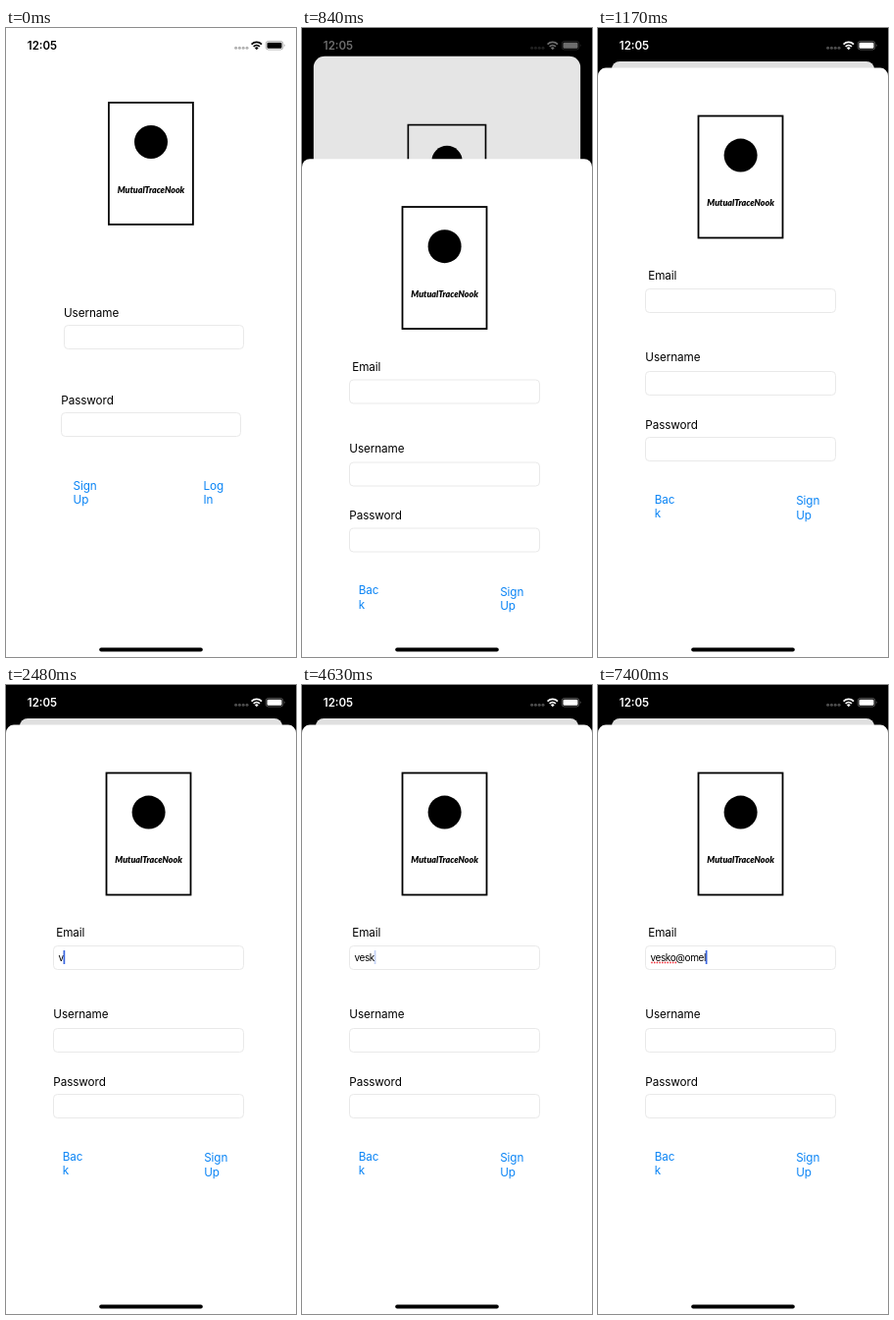
An HTML page for the animation above (8 s loop, 296 by 640 pixels).

```html
<!DOCTYPE html>
<html lang="en">
<head>
<meta charset="utf-8">
<title>Sign up sheet</title>
<style>
  html, body { margin: 0; width: 100%; height: 100%; overflow: hidden; background: #000; }
  svg { display: block; width: 296px; height: 640px; }
  text { font: 11.7px Inter, "Liberation Sans", sans-serif; letter-spacing: -.08px; white-space: pre; }
  .brand { font: italic 900 8.9px Lato, sans-serif; letter-spacing: 0; text-anchor: middle; }
  .clock { font-weight: 600; font-size: 11.5px; letter-spacing: 0; }
  .entry { font-size: 10px; letter-spacing: -.4px; }
  .link { fill: #0a84f5; }
  .field { fill: #fff; stroke: #e9e9e9; }
  #login .field { fill: none; }
  .squiggle { stroke: #f0323c; stroke-width: 1.7; stroke-linecap: round; stroke-dasharray: 0 2.7; }
</style>
</head>
<body>
<svg viewBox="0 0 296 640">
  <defs>
    <g id="logo">
      <rect x="104.9" y="75.9" width="86" height="124" fill="none" stroke="#000" stroke-width="1.8"/>
      <circle cx="148" cy="116" r="17"/>
      <text class="brand" x="148" y="167.5">MutualTraceNook</text>
    </g>
  </defs>

  <rect width="296" height="640"/>

  <g id="login">
    <rect id="page" width="296" height="700" fill="#fff"/>
    <use href="#logo"/>
    <text x="59" y="293.6">Username</text>
    <rect class="field" x="59.5" y="302.5" width="183" height="24" rx="4"/>
    <text x="56.3" y="382.6">Password</text>
    <rect class="field" x="56.5" y="391.5" width="183" height="24" rx="4"/>
    <g id="signUp" class="link">
      <text x="68.6" y="469.6">Sign</text>
      <text x="68.6" y="484.1">Up</text>
    </g>
    <g class="link">
      <text x="201.5" y="469.6">Log</text>
      <text x="201.5" y="484.1">In</text>
    </g>
    <rect id="dim" width="296" height="700"/>
  </g>

  <g id="sheet">
    <path id="panel" fill="#fff"/>
    <use href="#logo" x="-2.4" y="-27"/>
    <text x="51.2" y="215.8">Email</text>
    <rect class="field" x="48.5" y="224.9" width="194" height="24" rx="4"/>
    <text x="48.3" y="298.8">Username</text>
    <rect class="field" x="48.5" y="308.9" width="194" height="24" rx="4"/>
    <text x="48.3" y="367">Password</text>
    <rect class="field" x="48.5" y="375.9" width="194" height="24" rx="4"/>
    <g class="link">
      <text x="57.8" y="443.3">Bac</text>
      <text x="57.8" y="457.8">k</text>
      <text x="202.2" y="444.8">Sign</text>
      <text x="202.2" y="459.3">Up</text>
    </g>
    <path id="squiggle" class="squiggle" d="M55 241.8H79.5"/>
    <text id="entry" class="entry" x="53.5" y="240.4"></text>
    <rect id="caret" y="229.4" width="1.7" height="14" fill="#3a66e0"/>
  </g>

  <g id="status">
    <text class="clock" x="21.8" y="22">12:05</text>
    <g opacity=".3">
      <circle cx="234.6" cy="20.2" r="1.5"/>
      <circle cx="238.4" cy="20.2" r="1.5"/>
      <circle cx="242.2" cy="20.2" r="1.5"/>
      <circle cx="246" cy="20.2" r="1.5"/>
    </g>
    <g class="stroked" fill="none" stroke-width="1.8">
      <path d="M250.6 16.6a7.4 7.4 0 0 1 10.4 0"/>
      <path d="M252.7 18.9a4.4 4.4 0 0 1 6.2 0"/>
    </g>
    <path d="M255.8 22.3l-1.9-2a2.7 2.7 0 0 1 3.8 0z"/>
    <rect class="stroked" x="265.2" y="13.4" width="17.6" height="8.6" rx="2.6" fill="none" stroke-width=".8" opacity=".38"/>
    <rect x="266.5" y="14.7" width="15" height="6" rx="1.3"/>
    <path d="M283.9 16.2q1.5 1.5 0 3z" opacity=".45"/>
  </g>
  <rect x="95.2" y="630.6" width="105.6" height="3.8" rx="1.9"/>
</svg>

<script>
  const LOOP = 8000, REST = 40.6, HEIGHT = 640;
  const EMAIL = "vesko@omel";

  // The slide advances only at these moments
  const ticks = [0, 500, 610, 720, 840, 960, 1060, 1170];

  // [time, typed characters, caret opacity]
  const typing = [
    [0, 0, 0], [1730, 0, 1], [2370, 0, .3],
    [2480, 1, 1], [2690, 2, 1], [2930, 3, 1], [3090, 4, 1],
    [3720, 4, .3], [3850, 4, 0], [4000, 4, .4], [4130, 4, 1],
    [4630, 4, .3], [4770, 4, 0], [4970, 4, .4], [5090, 4, 1], [5630, 4, .9],
    [6160, 6, 1], [6780, 6, .3],
    [7000, 7, 1], [7140, 8, 1], [7280, 9, 1], [7400, 10, 1]
  ];

  const el = id => document.getElementById(id);
  const set = (id, attrs) => {
    for (const key in attrs) el(id).setAttribute(key, attrs[key]);
  };
  const clamp = x => Math.min(1, Math.max(0, x));

  // Critically damped spring, 0 to 1
  function spring(t) {
    const x = Math.max(0, t - 650.5) * .0176;
    return 1 - (1 + x) * Math.exp(-x);
  }

  function panelPath(foot) {
    const h = HEIGHT - REST;
    return `M0 8a8 8 0 0 1 8-8H288a8 8 0 0 1 8 8V${h - foot}` +
      `a${foot} ${foot} 0 0 1 ${-foot} ${foot}H${foot}a${foot} ${foot} 0 0 1 ${-foot} ${-foot}z`;
  }

  function drawSlide(t) {
    const p = spring(t);
    const scale = 1 - .0946 * p;
    const top = HEIGHT - (HEIGHT - REST) * p;
    const radius = p > 0 ? 30 - 21 * p : 0;
    const tone = Math.round(255 * clamp((t - 720) / 280));
    const ink = `rgb(${tone},${tone},${tone})`;

    set("login", { transform: `translate(${148 * (1 - scale)} ${34 * p}) scale(${scale})` });
    set("page", { rx: radius });
    set("dim", { rx: radius, opacity: .12 * p });
    set("signUp", { opacity: t < 500 ? 1 : t < 610 ? .2 : .45 });
    set("sheet", { transform: `translate(0 ${p > .998 ? REST : top})` });
    set("panel", { d: panelPath(p < .99 ? 30 : 0) });
    set("status", { fill: ink });
    for (const part of document.querySelectorAll(".stroked")) part.setAttribute("stroke", ink);
  }

  function drawTyping(t) {
    const [, count, opacity] = typing.findLast(step => step[0] <= t);
    const entry = el("entry");
    entry.textContent = EMAIL.slice(0, count);
    const width = count ? entry.getComputedTextLength() : 0;
    set("caret", { x: 53.3 + width, opacity });
    set("squiggle", { opacity: count > 5 ? 1 : 0 });
  }

  function frame(now) {
    const t = now % LOOP;
    drawSlide(ticks.findLast(tick => tick <= t));
    drawTyping(t);
    requestAnimationFrame(frame);
  }
  frame(0);
</script>
</body>
</html>
```
